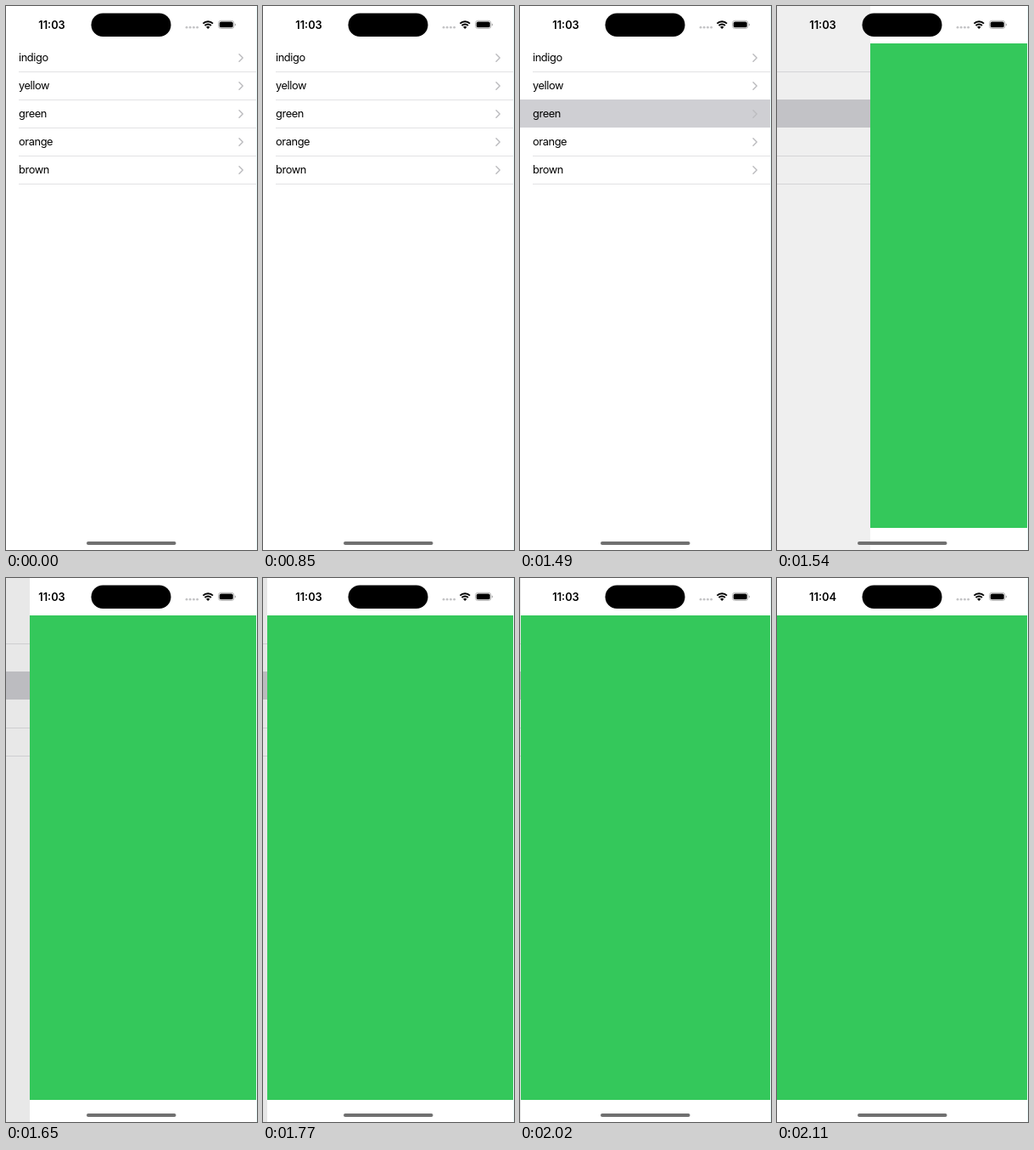
Animation, 296 px wide and 640 px high, one loop 2210 ms. Source, as an HTML page:

```html
<!DOCTYPE html>
<html lang="en">
<head>
<meta charset="utf-8">
<title>Colour list</title>
<style>
  html, body { margin: 0; width: 100%; height: 100%; overflow: hidden; background: #fff; }
  svg { display: block; width: 296px; height: 640px; }
  text { font: 12.8px Inter, Roboto, sans-serif; }
  .label { letter-spacing: -0.4px; }
  .clock { font-weight: 600; text-anchor: middle; }
  .chevron { fill: none; stroke: #bdbdc0; stroke-width: 1.5; stroke-linecap: round; stroke-linejoin: round; }
  .wifi { fill: none; stroke: #000; stroke-width: 1.9; }
</style>
</head>
<body>
<svg viewBox="0 0 296 640">
  <rect width="296" height="640" fill="#fff"/>
  <g id="list">
    <rect id="selection" y="110" width="296" height="33" fill="#cfcfd3" opacity="0"/>
    <g id="rows"></g>
  </g>
  <rect id="dim" width="296" height="640" opacity="0"/>
  <g id="detail">
    <rect width="296" height="640" fill="#fff"/>
    <rect y="44" width="296" height="570" fill="#34c85b"/>
  </g>
  <rect x="295" width="1" height="640" fill="#ecfcfc"/>

  <text id="before" class="clock" x="54" y="26.6">11:03</text>
  <text id="after" class="clock" x="54" y="26.6" opacity="0">11:04</text>
  <rect x="100.5" y="8.5" width="94" height="27.5" rx="13.75"/>
  <g fill="#c4c4c6">
    <circle cx="213" cy="25.2" r="1.4"/>
    <circle cx="217.2" cy="25.2" r="1.4"/>
    <circle cx="221.4" cy="25.2" r="1.4"/>
    <circle cx="225.6" cy="25.2" r="1.4"/>
  </g>
  <path class="wifi" d="M232.4 20.6A8.2 8.2 0 0 1 244 20.6M234.5 23A5.2 5.2 0 0 1 241.9 23"/>
  <path d="M238.2 27L236 24.7A3.2 3.2 0 0 1 240.4 24.7Z"/>
  <rect x="250.5" y="17.3" width="18.4" height="9.2" rx="2.9" fill="none" stroke="#a6a6a6" stroke-width=".8"/>
  <rect x="251.7" y="18.5" width="16" height="6.8" rx="1.9"/>
  <path d="M269.8 20.4Q271 20.8 271 21.9T269.8 23.4Z" fill="#a6a6a6"/>
  <rect x="95" y="630" width="105.5" height="4" rx="2" fill="#707070"/>
</svg>
<script>
  const LOOP = 2210, WIDTH = 295, ROW = 33, TOP = 44, CHOSEN = 2;
  const names = ['indigo', 'yellow', 'green', 'orange', 'brown'];
  // time in ms, left edge of the pushed screen
  const slide = [[0, WIDTH], [1540, 110], [1650, 28], [1770, 5], [1880, 1], [2110, 0]];
  const $ = id => document.getElementById(id);

  $('rows').innerHTML = names.map((name, i) => {
    const y = TOP + i * ROW;
    const near = i === CHOSEN || i === CHOSEN - 1;
    return `<text class="label" x="15" y="${y + 21.4}">${name}</text>
      <path class="chevron" d="M275 ${y + 12.8}l4.2 4.2l-4.2 4.2"/>
      <rect class="${near ? 'near' : ''}" x="15" y="${y + ROW}" width="280" height="1" fill="#e2e2e4"/>`;
  }).join('');

  function play(el, steps, style) {
    const frames = steps.map(([t, v]) => ({ offset: t / LOOP, easing: 'step-end', ...style(v) }));
    frames.push({ ...frames[frames.length - 1], offset: 1 });
    el.animate(frames, { duration: LOOP, iterations: Infinity });
  }
  const move = x => ({ transform: `translateX(${x}px)` });
  const fade = opacity => ({ opacity });

  play($('detail'), slide, move);
  play($('list'), slide, x => move(-0.3 * (WIDTH - x)));
  play($('dim'), slide, x => fade(0.1 * (1 - x / WIDTH)));
  play($('selection'), [[0, 0], [1420, 1]], fade);
  document.querySelectorAll('.near').forEach(el => play(el, [[0, 1], [1420, 0]], fade));
  play($('before'), [[0, 1], [2110, 0]], fade);
  play($('after'), [[0, 0], [2110, 1]], fade);
</script>
</body>
</html>
```
